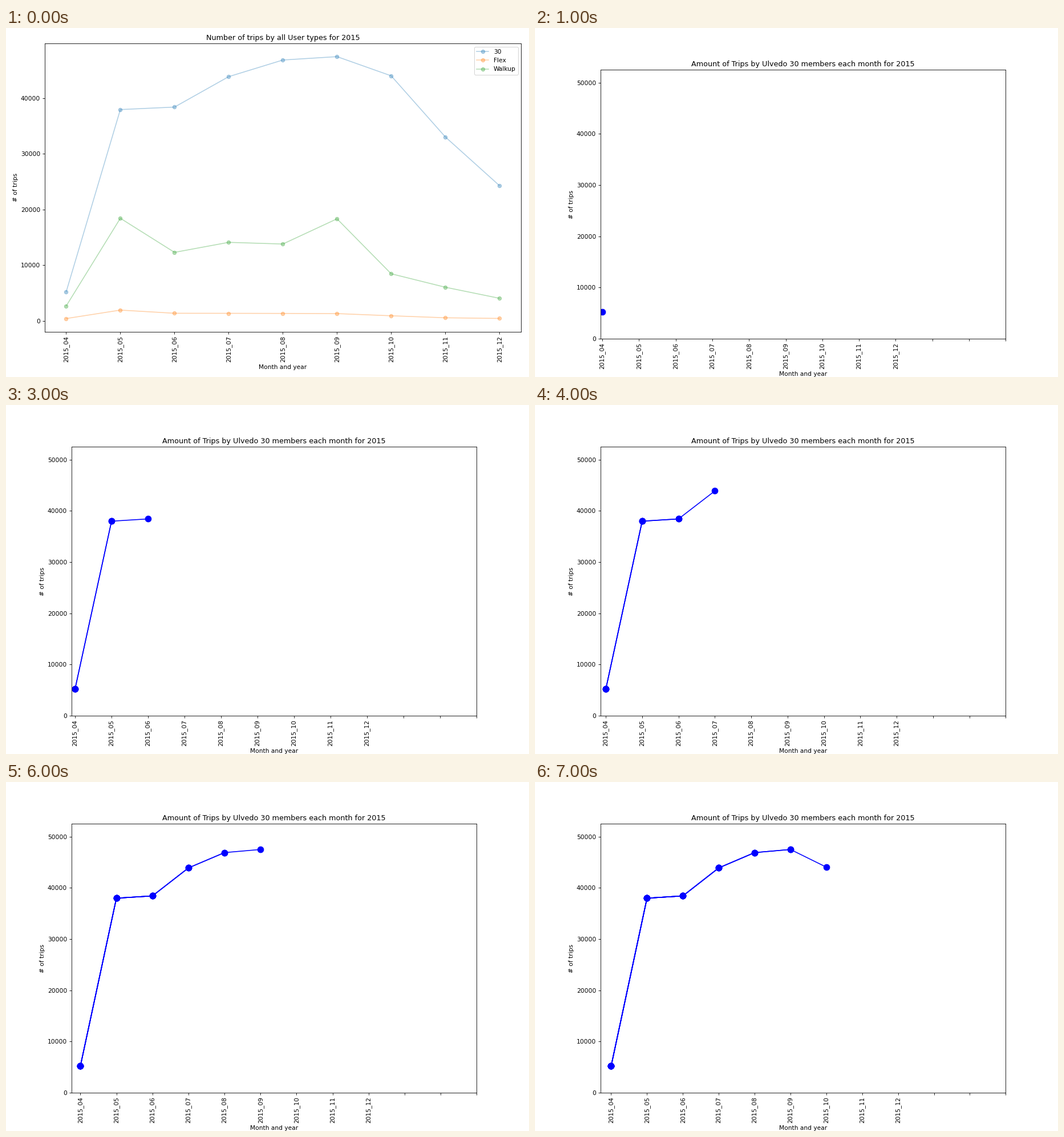
Animation, 917 px wide and 611 px high, one loop 8000 ms. Source, as a matplotlib script:

```python
import matplotlib.pyplot as plt
from matplotlib.animation import FuncAnimation

W, H = 917, 611
DPI = 76.375
MONTHS = [f"2015_{m:02d}" for m in range(4, 13)]
TRIPS = {
    "30": [5190, 37975, 38420, 43890, 46880, 47490, 44040, 33050, 24290],
    "Flex": [400, 1920, 1350, 1340, 1320, 1290, 900, 540, 420],
    "Walkup": [2650, 18430, 12300, 14100, 13800, 18330, 8450, 6030, 4040],
}
MEMBERS = TRIPS["30"]

plt.rcParams["font.family"] = "DejaVu Sans"
# the tiny offset keeps the pixel size from rounding down
fig = plt.figure(figsize=((W + 1e-6) / DPI, (H + 1e-6) / DPI), dpi=DPI)


def add_axes(left, top, right, bottom, title):
    """Axes placed by pixel edges, measured from the top left."""
    ax = fig.add_axes([left / W, 1 - bottom / H,
                       (right - left) / W, (bottom - top) / H])
    ax.set_title(title)
    ax.set_xlabel("Month and year")
    ax.set_ylabel("# of trips")
    return ax


def draw_overview():
    ax = add_axes(67.5, 27.2, 903.3, 531.6,
                  "Number of trips by all User types for 2015")
    for name, values in TRIPS.items():
        ax.plot(values, "o-", alpha=0.35, label=name)
    ax.set_xticks(range(len(MONTHS)), MONTHS, rotation=90)
    ax.legend(loc="upper right")


def draw_members(count):
    ax = add_axes(0.125 * W, 0.12 * H, 0.9 * W, 0.89 * H,
                  "Amount of Trips by Ulvedo 30 members each month for 2015")
    # each step plots the whole line again, so older parts grow bolder
    for k in range(1, count + 1):
        ax.plot(MEMBERS[:k], "bo-", markersize=10)
    labels = MONTHS + [""] * 3
    ax.set_xticks(range(len(labels)), labels, rotation=90)
    margin = 0.05 * (count - 1) if count > 1 else 0.055
    ax.set_xlim(-margin, len(labels) - 1)
    ax.set_ylim(0, max(MEMBERS) + 5000)


def update(step):
    fig.clear()
    if step == 0:
        draw_overview()
    else:
        draw_members(step)
    return fig.axes


anim = FuncAnimation(fig, update, frames=8, interval=1000, repeat=True,
                     repeat_delay=0, blit=False)
plt.show()
```
